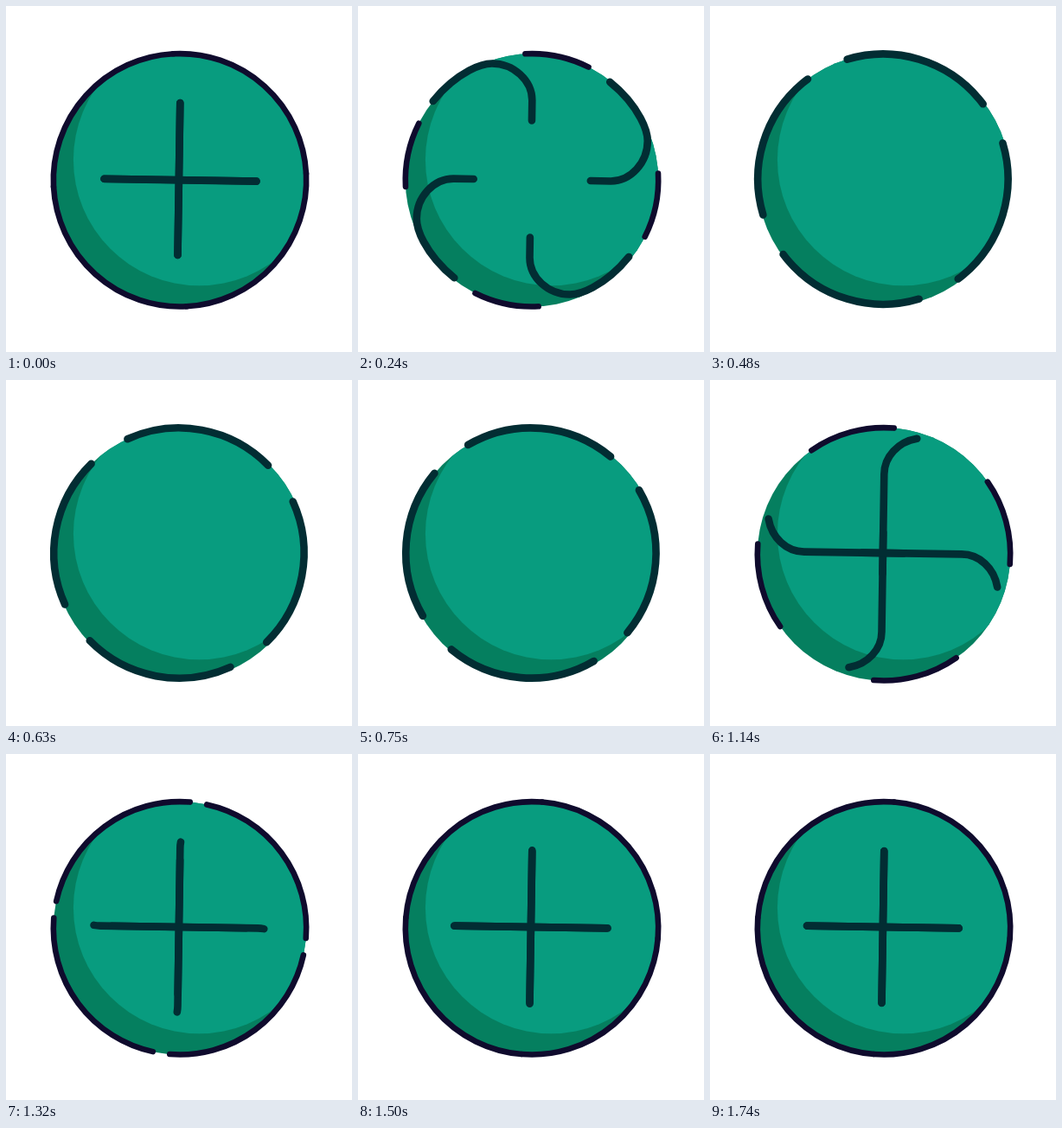
Write an HTML page with a canvas that moves like this. It is 400 px wide and 400 px high and loops after 3.86 s.

```html
<!DOCTYPE html>
<html lang="en">
<head>
<meta charset="utf-8">
<title>Plus button</title>
<style>
html, body { margin: 0; width: 100%; height: 100%; overflow: hidden; background: #fff; }
canvas { display: block; width: 400px; height: 400px; }
</style>
</head>
<body>
<canvas id="stage"></canvas>
<script>
const LOOP = 3860, STEP = 30, LAST = 58;
const LIGHT = '#089c7f', SHADE = '#057f5f', NAVY = '#0f0b2d', INK = '#022d33';
const DISC = { x: 201, y: 201.3, r: 146.2 };
const HUB = { x: 199.9, y: 200 };
const DASH = 176, HALF = 312, SETTLE = 3;

const canvas = document.getElementById('stage');
const ctx = canvas.getContext('2d');
const dpr = window.devicePixelRatio || 1;
canvas.width = canvas.height = 400 * dpr;

// One stroke's route: across the plus, out to the rim, along it, and back across.
const route = [
  'M-1.4 88 L1.4 -91',
  'C1.4 -114 -20 -133.5 -45 -133.5 C-62 -133.5 -82.3 -119.7 -93 -110.7',
  'A144.5 144.5 0 0 0 -93 110.7',
  'C-82.3 119.7 -62 133 -48 133 C-22 133 -1.4 114 -1.4 91',
  'L1.4 -88'
].join(' ');
const strokePath = new Path2D(route);
const probe = document.createElementNS('http://www.w3.org/2000/svg', 'path');
probe.setAttribute('d', route);
const travelMax = probe.getTotalLength() - DASH;

function bezier(x1, x2) {
  const at = (u, a, b) => 3 * u * (1 - u) * (1 - u) * a + 3 * u * u * (1 - u) * b + u * u * u;
  return x => {
    if (x <= 0) return 0;
    if (x >= 1) return 1;
    let lo = 0, hi = 1;
    for (let i = 0; i < 30; i++) {
      const mid = (lo + hi) / 2;
      if (at(mid, x1, x2) < x) lo = mid; else hi = mid;
    }
    return at(lo, 0, 1);
  };
}
const quick = bezier(0.34, 0.33);
const steep = bezier(0.667, 0.333);

function disc(x, y, r, color) {
  ctx.beginPath();
  ctx.arc(x, y, r, 0, Math.PI * 2);
  ctx.fillStyle = color;
  ctx.fill();
}

function drawButton() {
  ctx.save();
  ctx.beginPath();
  ctx.arc(DISC.x, DISC.y, DISC.r, 0, Math.PI * 2);
  ctx.clip();
  disc(DISC.x, DISC.y, DISC.r + 2, SHADE);
  disc(223.3, 177.8, 145.4, LIGHT);
  ctx.restore();
}

// Four arcs of the outline shrink towards one end, then grow back from another.
function drawRim(k) {
  const gone = quick(k / 17);
  const back = steep((k - 26.3) / 24.4);
  const span = gone < 1 ? 90 * (1 - gone) : 90 * back;
  if (span < 0.5) return;
  const start = gone < 1 ? -93 : 4.6 - span;
  const rad = Math.PI / 180;
  ctx.strokeStyle = NAVY;
  ctx.lineWidth = 6.6;
  for (let i = 0; i < 4; i++) {
    const a = start + i * 90;
    ctx.beginPath();
    ctx.arc(DISC.x, DISC.y, DISC.r, a * rad, (a + span) * rad);
    ctx.stroke();
  }
}

function drawStrokes(k) {
  const travel = HALF * quick(k / 21.3)
    + (travelMax - HALF - SETTLE) * steep((k - 18.6) / 30)
    + SETTLE * quick((k - 44) / 14);
  // The horizontal pair starts slightly off centre.
  const nudge = 1 - steep(k / 24);
  ctx.strokeStyle = INK;
  ctx.lineWidth = 8.6;
  ctx.setLineDash([DASH, 3000]);
  ctx.lineDashOffset = -travel;
  for (let i = 0; i < 4; i++) {
    const shift = i % 2 ? nudge : 0;
    ctx.save();
    ctx.translate(HUB.x + 1.6 * shift, HUB.y + 1.2 * shift);
    ctx.rotate(i * Math.PI / 2);
    ctx.stroke(strokePath);
    ctx.restore();
  }
  ctx.setLineDash([]);
}

function draw(time) {
  const k = Math.min(LAST, Math.floor((time % LOOP) / STEP));
  ctx.setTransform(dpr, 0, 0, dpr, 0, 0);
  ctx.fillStyle = '#fff';
  ctx.fillRect(0, 0, 400, 400);
  ctx.lineCap = 'round';
  drawButton();
  drawRim(k);
  drawStrokes(k);
}

let origin = null;
function tick(now) {
  if (origin === null) origin = now;
  draw(now - origin);
  requestAnimationFrame(tick);
}
draw(0);
requestAnimationFrame(tick);
</script>
</body>
</html>
```
